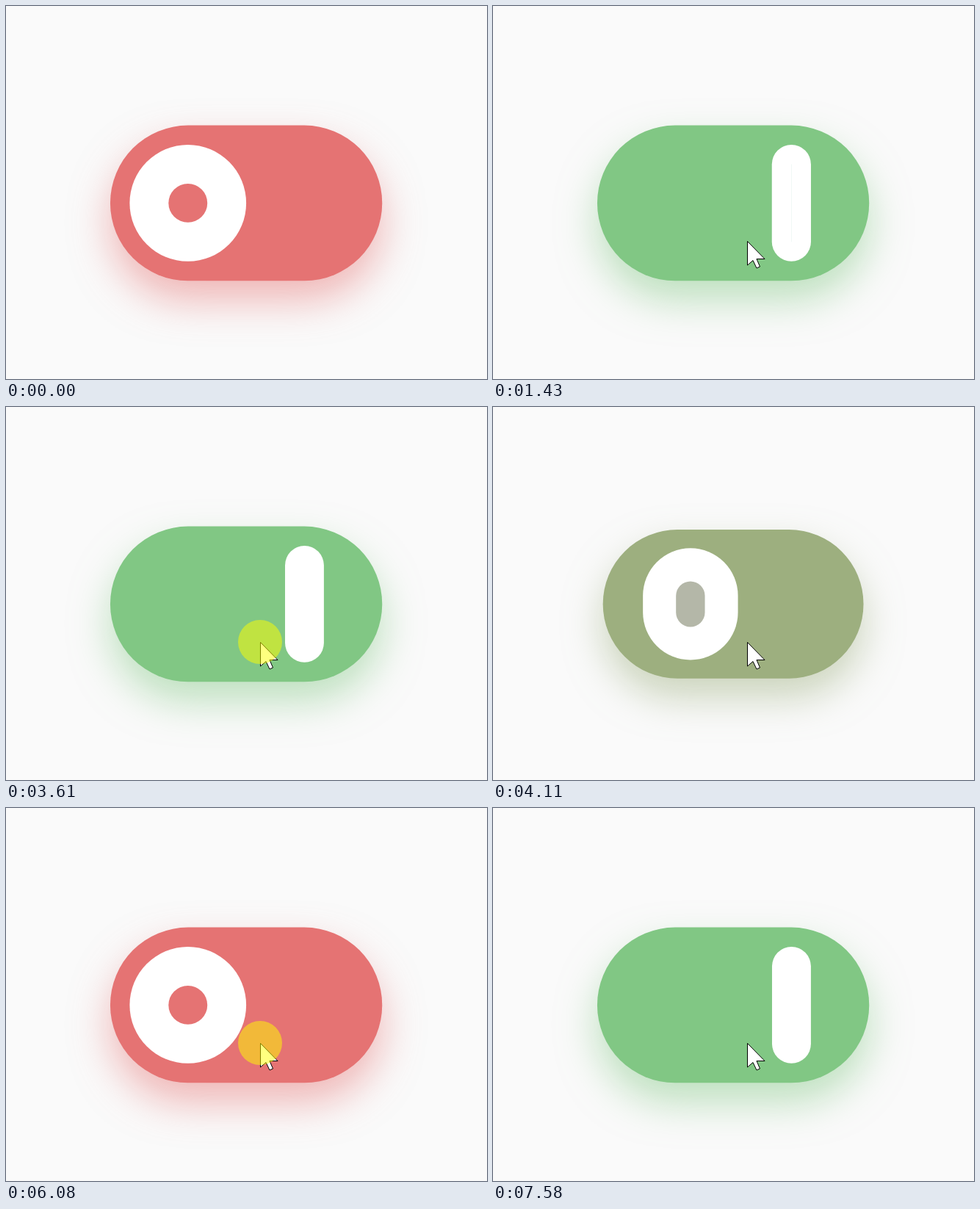
Recreate the animation shown at these times as an HTML page with a canvas. Size 655x508 px, loop 8000 ms.

```html
<!DOCTYPE html>
<html lang="en">
<head>
<meta charset="utf-8">
<title>Toggle</title>
<style>
  html, body { margin: 0; height: 100%; overflow: hidden; background: #fafafa; }
  canvas { display: block; }
</style>
</head>
<body>
<canvas id="stage" width="655" height="508"></canvas>
<script>
const ctx = document.getElementById('stage').getContext('2d');
const LOOP = 8000;
const UNIT = 26.45;
const CENTER = { x: 327.1, y: 268.4 };
const RED = [229, 115, 115], GREEN = [129, 199, 132], PALE = [161, 210, 189];

const SWITCH_TIME = 300, WOBBLE_TIME = 1000;
const SWITCHES = [
  { at: 1140, on: true },
  { at: 3932, on: false },
  { at: 6320, on: true }
];
const PRESSES = [[860, 1070], [3610, 3810], [6080, 6310]];
const POINTER = { start: 150, end: 630, from: [560, 498], to: [346, 320] };

// Time and horizontal stretch of the knob after it lands
const WOBBLE = [[0, 1], [.3, 1.25], [.4, .75], [.5, 1.15], [.65, .95], [.75, 1.05], [1, 1]];
const DIP = [[0, 1], [.5, .942], [1, 1]];

const clamp = v => Math.min(1, Math.max(0, v));
const lerp = (a, b, p) => a + (b - a) * p;
const mix = (a, b, p) => a.map((v, i) => lerp(v, b[i], p));
const css = (rgb, alpha = 1) => `rgba(${rgb.map(Math.round)},${alpha})`;

// cubic-bezier(.25, .1, .25, 1)
function ease(x) {
  if (x <= 0 || x >= 1) return clamp(x);
  let lo = 0, hi = 1, s;
  for (let i = 0; i < 20; i++) {
    s = (lo + hi) / 2;
    const bx = .75 * s * (1 - s) + s ** 3;
    if (bx < x) lo = s; else hi = s;
  }
  return .3 * s * (1 - s) ** 2 + 3 * s * s * (1 - s) + s ** 3;
}

function keyframes(frames, p) {
  for (let i = 1; i < frames.length; i++) {
    const [t0, a] = frames[i - 1], [t1, b] = frames[i];
    if (p <= t1) return lerp(a, b, ease((p - t0) / (t1 - t0)));
  }
  return frames[frames.length - 1][1];
}

function pill(width, height, color) {
  ctx.beginPath();
  ctx.roundRect(-width / 2, -height / 2, width, height, Math.min(width, height) / 2);
  ctx.fillStyle = color;
  ctx.fill();
}

function drawToggle(t) {
  const last = SWITCHES.filter(s => t >= s.at).pop() || { at: -LOOP, on: false };
  const age = t - last.at;
  const p = clamp(age / SWITCH_TIME);
  const tint = ease(p * 2 - 1);
  const toward = (off, on, q) => last.on ? lerp(off, on, q) : lerp(on, off, q);
  const blend = (off, on) => last.on ? mix(off, on, tint) : mix(on, off, tint);

  const scale = keyframes(DIP, p);
  const color = blend(RED, GREEN);
  const morph = 1 - (1 - p) ** 1.65;
  const width = toward(6, 2, morph) * UNIT;
  const border = toward(2, 1, morph) * UNIT;
  const stretch = keyframes(WOBBLE, clamp((age - SWITCH_TIME) / WOBBLE_TIME));

  ctx.save();
  ctx.translate(CENTER.x, CENTER.y);
  ctx.scale(scale, scale);

  ctx.shadowColor = css(color, .5);
  ctx.shadowOffsetY = UNIT * scale;
  ctx.shadowBlur = 2 * UNIT * scale;
  pill(14 * UNIT, 8 * UNIT, css(color));
  ctx.shadowColor = 'transparent';

  ctx.translate(toward(-3, 3, ease(p)) * UNIT, 0);
  ctx.scale(stretch, 1);
  pill(width, 6 * UNIT, '#fff');
  const hole = width - 2 * border;
  if (hole > .1) pill(hole, 6 * UNIT - 2 * border, css(blend(RED, PALE)));
  ctx.restore();
}

function drawPointer(t) {
  if (t < POINTER.start) return;
  const p = clamp((t - POINTER.start) / (POINTER.end - POINTER.start));
  const [x, y] = mix(POINTER.from, POINTER.to, 1 - (1 - p) ** 2).map(Math.round);
  ctx.save();
  ctx.translate(x + .5, y + .5);
  ctx.beginPath();
  [[0, 0], [0, 32.5], [7.5, 26], [12.5, 36.5], [17, 34.5], [12.5, 24], [23.5, 24]]
    .forEach(point => ctx.lineTo(...point));
  ctx.closePath();
  ctx.fillStyle = '#fff';
  ctx.fill();
  ctx.strokeStyle = '#000';
  ctx.lineWidth = 1;
  ctx.stroke();
  ctx.restore();
}

function drawPress(t) {
  if (!PRESSES.some(([down, up]) => t >= down && t < up)) return;
  ctx.beginPath();
  ctx.arc(346, 320, 30, 0, 2 * Math.PI);
  ctx.fillStyle = 'rgba(255,255,0,.5)';
  ctx.fill();
}

const startTime = performance.now();
function render() {
  const t = (performance.now() - startTime) % LOOP;
  ctx.fillStyle = '#fafafa';
  ctx.fillRect(0, 0, 655, 508);
  drawToggle(t);
  drawPointer(t);
  drawPress(t);
  requestAnimationFrame(render);
}
render();
</script>
</body>
</html>
```
